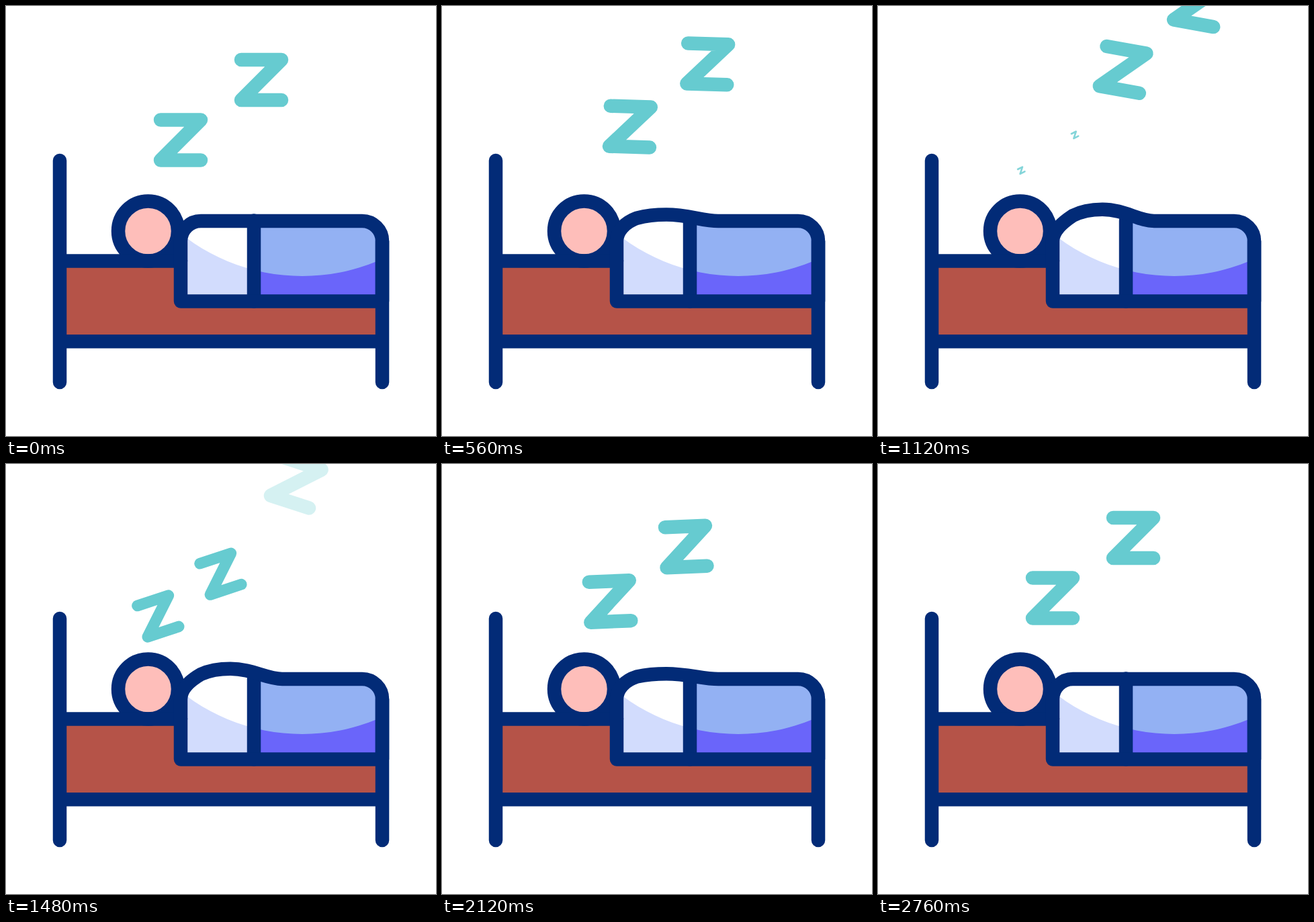
Write an HTML page that moves like this. It is 640 px wide and 640 px high and loops after 3000 ms.

```html
<!DOCTYPE html>
<html>
<head>
<meta charset="utf-8">
<style>
  html, body { margin: 0; width: 100%; height: 100%; overflow: hidden; background: #fff; }
  svg { display: block; width: 100vw; height: 100vh; }
  .line { fill: none; stroke: #022b77; stroke-width: 20.5; stroke-linecap: round; stroke-linejoin: round; }
  .z { fill: none; stroke: #66cbd0; stroke-width: 20.5; stroke-linecap: round; stroke-linejoin: round; }
</style>
</head>
<body>
<svg viewBox="0 0 640 640">
  <defs>
    <clipPath id="inside"><path class="blanket"/></clipPath>
    <clipPath id="shade"><path d="M151 112A290 290 0 0 0 731 112V460H151Z"/></clipPath>
  </defs>
  <path fill="#b55348" d="M80 380H260V439.5H560V499.3H80Z"/>
  <circle class="line" cx="211.5" cy="335" r="44.5" style="fill:#febeba"/>
  <g clip-path="url(#inside)">
    <path fill="#fff" d="M260 290H369V440H260Z"/>
    <path fill="#93b1f3" d="M369 290H560V440H369Z"/>
    <g clip-path="url(#shade)">
      <path fill="#d2dcfd" d="M260 290H369V440H260Z"/>
      <path fill="#6a65fa" d="M369 290H560V440H369Z"/>
    </g>
  </g>
  <path class="line" d="M80 230V560M80 379.5H260M80 499.3H560M560 350V560M369 319.5V439.5"/>
  <path class="blanket line"/>
  <path class="z"/><path class="z"/><path class="z"/><path class="z"/>
</svg>
<script>
const LOOP = 3000;
const blankets = document.querySelectorAll('.blanket');
const zs = document.querySelectorAll('.z');
zs.forEach(z => z.setAttribute('d', 'M-30-30H30L-30 30H30'));

const ramp = (t, from, to) => Math.min(1, Math.max(0, (t - from) / (to - from)));
const smooth = (t, from, to) => {
  const u = ramp(t, from, to);
  return u * u * (3 - 2 * u);
};

// Chest height, 0 = flat, 1 = full breath
function breath(t) {
  if (t < 980) return smooth(t, 100, 980);
  const u = ramp(t, 1000, 2760);
  return 1 - u * u * (2 - u);
}

function drawBlanket(b) {
  const p = (x0, y0, x1, y1) => `${x0 + (x1 - x0) * b} ${y0 + (y1 - y0) * b} `;
  const top = 320 - 17.5 * b;
  const d = 'M260 350C' +
    p(260, 333.4, 260, 336) + p(273.4, 320, 272, 324) + p(290, 320, 290, 312) +
    'C' + p(305, 320, 302, 305.5) + `318 ${top} 334 ${top}` +
    `C366 ${top} 388 320 411 320` +
    'H530C546.6 320 560 333.4 560 350V439.5H260Z';
  blankets.forEach(el => el.setAttribute('d', d));
}

function placeZ(el, x, y, angle, scale, opacity) {
  el.setAttribute('transform', `translate(${x} ${y}) rotate(${angle}) scale(${scale})`);
  el.setAttribute('opacity', opacity);
}

function draw(t) {
  drawBlanket(breath(t));

  // Pair drifting away
  const out = smooth(t, 200, 2400);
  const tilt = out * (24 + 8 * out);
  const fade = 1 - ramp(t, 1240, 1570);
  placeZ(zs[0], 260 + 276 * out, 199.5 - 276 * out, tilt, 1, fade);
  placeZ(zs[1], 380 + out * (202 + 128 * out), 110 - out * (335 - 92 * out), tilt, 1, fade);

  // Pair growing in
  const left = 1 - smooth(t, 500, 2700);
  const lean = -30 * (1 - smooth(t, 800, 2400));
  const size = smooth(t, 960, 1680);
  const show = ramp(t, 960, 1160);
  placeZ(zs[2], 260 - 58 * left, 199.5 + left * (21.6 + 42.8 * left), lean, size, show);
  placeZ(zs[3], 380 - left * (95 + 16 * left), 110 + left * (68.6 + 41 * left), lean, size, show);
}

const start = performance.now();
function tick() {
  draw((performance.now() - start) % LOOP);
  requestAnimationFrame(tick);
}
tick();
</script>
</body>
</html>
```
